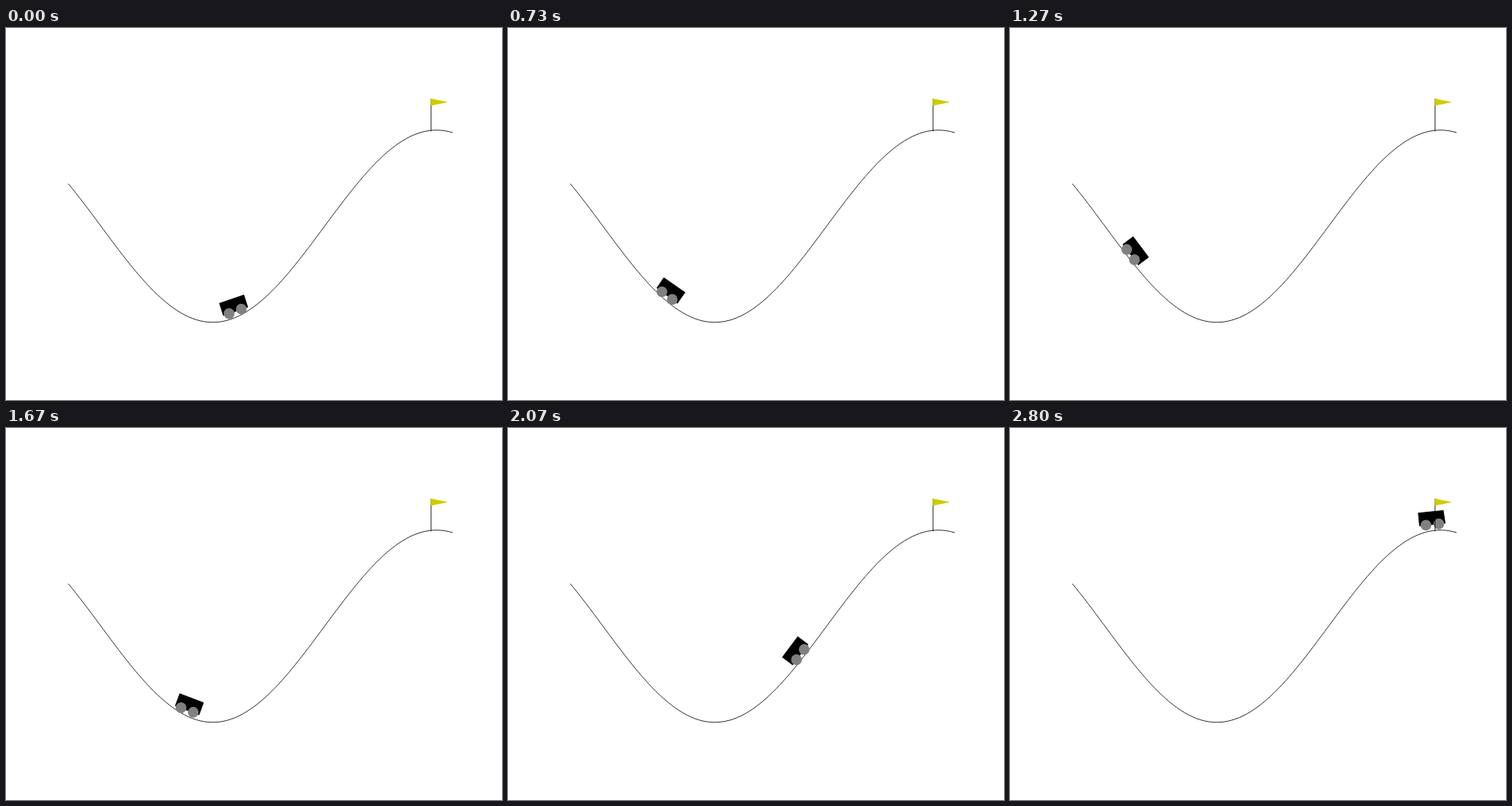
An HTML page with a canvas that plays this animation: 640x480 px, repeating every 2.83 s.

```html
<!DOCTYPE html>
<html lang="en">
<head>
<meta charset="utf-8">
<title>Mountain car</title>
<style>
html, body { margin: 0; height: 100%; overflow: hidden; background: #fff; }
canvas { display: block; }
</style>
</head>
<body>
<canvas id="stage" width="640" height="480"></canvas>
<script>
const ctx = document.getElementById('stage').getContext('2d');
const LOOP = 2830, STEPS = 85, MIN = -1.2, SCALE = 600 / 1.8, ZOOM = 496 / 600;
const X = pos => (pos - MIN) * SCALE;
const Y = pos => (0.45 * Math.sin(3 * pos) + 0.55) * SCALE;

// Swing left, then push right, then coast to the flag.
const push = step => step < 35 ? -0.001 : step < 80 ? 0.001 : 0;
const places = [];
for (let step = 0, pos = -0.4157, speed = 0; step < STEPS; step++) {
  places.push(pos);
  speed += push(step) - 0.0025 * Math.cos(3 * pos);
  pos += speed;
}

function path(points) {
  ctx.beginPath();
  for (const [x, y] of points) ctx.lineTo(x, y);
}

function polygon(points, color) {
  path(points);
  ctx.closePath();
  ctx.fillStyle = ctx.strokeStyle = color;
  ctx.fill();
  ctx.stroke();
}

function drawTrack() {
  path(Array.from({ length: 100 }, (_, i) => {
    const pos = MIN + 1.8 * i / 99;
    return [X(pos), Y(pos)];
  }));
  ctx.strokeStyle = '#000';
  ctx.stroke();
}

function drawCar(pos) {
  const angle = Math.cos(3 * pos), c = Math.cos(angle), s = Math.sin(angle);
  // The car sits on whole pixels.
  const place = ([x, y]) => [
    Math.trunc(x * c - y * s + X(pos)),
    Math.trunc(x * s + y * c + 10 + Y(pos))
  ];
  polygon([[-20, 0], [-20, 20], [20, 20], [20, 0]].map(place), '#000');
  ctx.fillStyle = '#808080';
  for (const offset of [10, -10]) {
    ctx.beginPath();
    ctx.arc(...place([offset, 0]), 8.4, 0, 2 * Math.PI);
    ctx.fill();
  }
}

function drawFlag() {
  const x = Math.trunc(X(0.5)), base = Math.trunc(Y(0.5)), top = base + 50;
  ctx.fillStyle = '#000';
  ctx.fillRect(x - 0.5, base - 0.5, 1, 51);
  polygon([[x, top], [x, top - 10], [x + 25, top - 5]], '#cccc00');
}

function draw(now) {
  const ticks = Math.floor(now % LOOP / 10);
  const step = Math.min(STEPS - 1, Math.floor((ticks + 0.34) * 0.3));
  ctx.setTransform(1, 0, 0, 1, 0, 0);
  ctx.fillStyle = '#fff';
  ctx.fillRect(0, 0, 640, 480);
  ctx.setTransform(ZOOM, 0, 0, -ZOOM, 80.41, 407.32);
  drawTrack();
  drawCar(places[step]);
  drawFlag();
}

function tick() {
  draw(performance.now());
  requestAnimationFrame(tick);
}
ctx.lineJoin = 'round';
tick();
</script>
</body>
</html>
```
